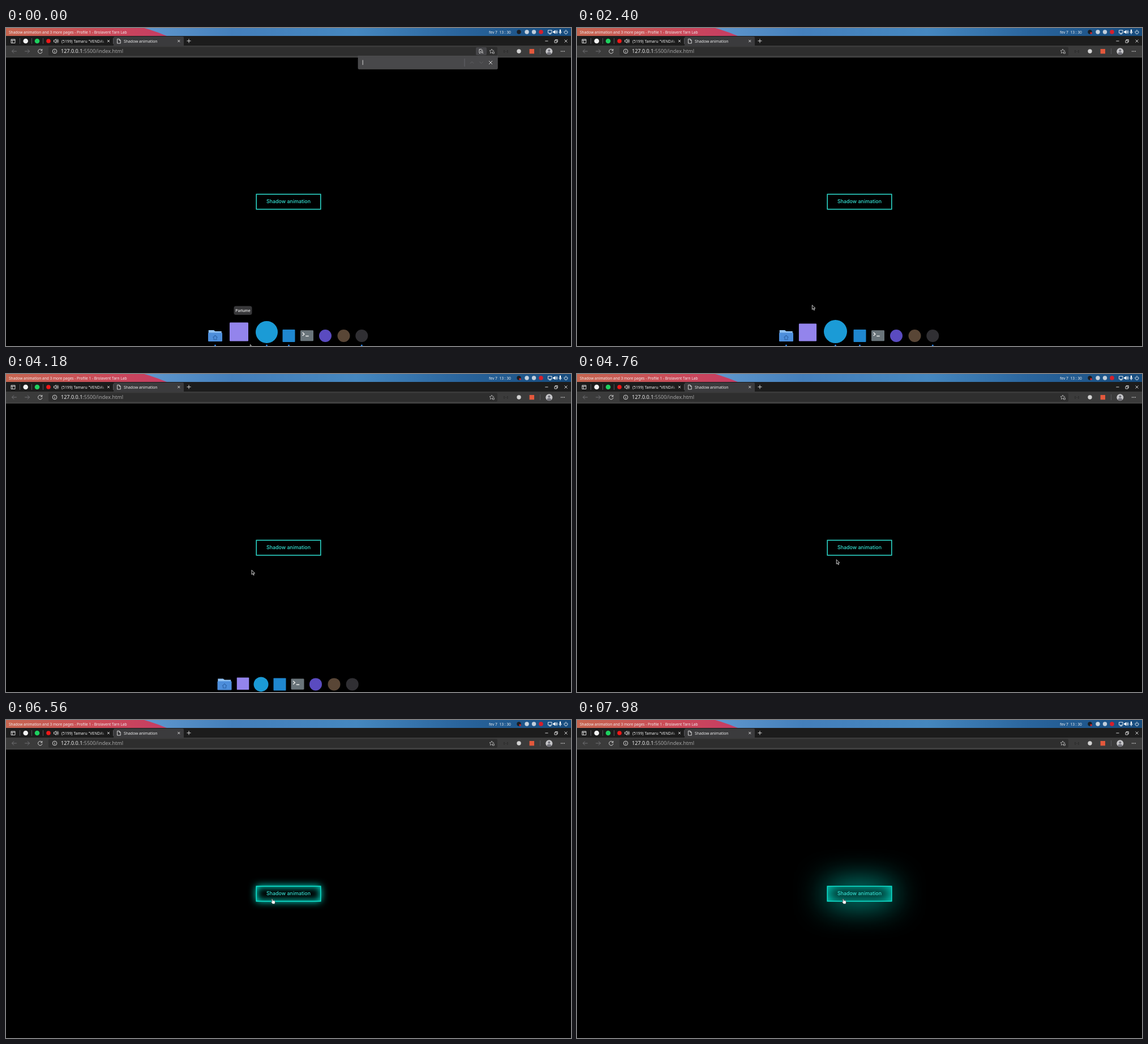
Recreate the animation shown at these times as an HTML page. Size 998x561 px, loop 8 s.

```html
<!DOCTYPE html>
<html lang="en">
<head>
<meta charset="utf-8">
<title>Shadow animation</title>
<style>
  html, body { margin: 0; width: 100%; height: 100%; overflow: hidden; background: #000; }
  svg { position: absolute; left: 0; top: 0; }
  text { font-family: "Noto Sans", sans-serif; fill: #eee; white-space: pre; }
  .line { fill: none; stroke: #e4e4e4; stroke-width: .9; }
  .dim { stroke: #77777a; }
  .rule { stroke: #55555a; stroke-width: 1; }
  #glow {
    position: absolute; left: 442px; top: 293px; width: 114px; height: 27px;
    box-sizing: border-box; border: 1px solid transparent;
  }
  .label { font: 500 8.9px Inter, sans-serif; fill: #35e2d4; text-anchor: middle; }
</style>
</head>
<body>
<svg width="998" height="561" viewBox="0 0 998 561">
  <defs>
    <linearGradient id="sky">
      <stop offset=".24" stop-color="#6199cf"/><stop offset=".4" stop-color="#447fbb"/>
      <stop offset=".62" stop-color="#4587bf"/><stop offset=".8" stop-color="#2a659d"/>
      <stop offset="1" stop-color="#164b7d"/>
    </linearGradient>
    <linearGradient id="dusk">
      <stop offset="0" stop-color="#c66650"/><stop offset=".6" stop-color="#cb4a58"/>
      <stop offset="1" stop-color="#c63c64"/>
    </linearGradient>
    <linearGradient id="fade">
      <stop offset=".8" stop-color="#eee"/><stop offset="1" stop-color="#eee" stop-opacity=".1"/>
    </linearGradient>
    <clipPath id="page"><path d="M600 49H900V90H600Z"/></clipPath>
    <clipPath id="tabTitle"><path d="M96 15H173V31H96Z"/></clipPath>
  </defs>

  <!-- system bar -->
  <path fill="url(#sky)" d="M0 0H998V14H0Z"/>
  <path fill="url(#dusk)" d="M0 0H244Q266 6 284 14H0Z"/>
  <text x="5" y="9.7" font-size="6.55">Shadow animation and 3 more pages - Profile 1 - Brolavent Tarn Lab</text>
  <text x="853" y="10" font-size="6.7">fev 7  13 : 30</text>
  <circle cx="906" cy="7" r="3.7" fill="#1b1d22"/>
  <circle id="recording" cx="908" cy="9" r="1.7" fill="#e02020"/>
  <circle cx="920" cy="7" r="3.7" fill="#c6d2de"/>
  <circle cx="932.5" cy="7" r="3.7" fill="#c0cddb"/>
  <circle cx="945" cy="7" r="3.8" fill="#d81f2c"/>
  <g class="line" style="stroke:#fff">
    <path d="M957.5 4H964V9H957.5ZM959 10.5H963"/>
    <path fill="#fff" d="M966.5 6H968L970 4V10L968 8H966.5Z"/>
    <path d="M971.5 5Q973 7 971.5 9M972.8 3.8Q975 7 972.8 10.2"/>
    <path d="M979 3.5V7" stroke-width="2.2" stroke-linecap="round"/>
    <path d="M976.8 6.5Q977 9 979 9T981.2 6.5M979 9V11"/>
    <path d="M987.3 4.8A3 3 0 1 0 990.7 4.8M989 3.2V7"/>
  </g>

  <!-- tab strip -->
  <path fill="#1c1c1c" d="M0 14H998V31H0Z"/>
  <path fill="#3b3b3d" d="M190 31V17Q190 15 192 15H312Q314 15 314 17V31Z"/>
  <path class="rule" d="M24.5 18V28M45.5 18V28M65.5 18V28M189.5 18V28"/>
  <path class="line" d="M9 20H16V26.5H9ZM9 21.7H16M11.3 22V26"/>
  <circle cx="34.7" cy="23" r="4.3" fill="#f2f2f2"/>
  <circle cx="55" cy="23" r="4.3" fill="#1ed05f"/>
  <circle cx="75" cy="23" r="3.8" fill="#f01818"/>
  <path class="line" d="M84.5 21.5H86L88.5 19.5V26.5L86 24.5H84.5ZM90 21Q91.3 23 90 25M91.3 19.5Q93.5 23 91.3 26.5"/>
  <text x="98" y="25.5" font-size="6.8" clip-path="url(#tabTitle)" style="fill:url(#fade)">(5199) Tamaru "VENDAVA</text>
  <path class="line" d="M179 21L183 25M183 21L179 25M303.3 21L307.3 25M307.3 21L303.3 25"/>
  <path class="line" d="M196.5 19.3H200L202.3 21.6V27H196.5ZM199.8 19.5V21.8H202"/>
  <text x="208" y="25.5" font-size="6.8">Shadow animation</text>
  <path class="line" d="M319.5 22.8H326.5M323 19.3V26.3"/>
  <path class="line" d="M952.3 23H957.5M969 22H973V26H969ZM970.3 22V20.5H974.3V24.6H973M986.5 20.5L991.5 25.5M991.5 20.5L986.5 25.5"/>

  <!-- toolbar -->
  <path fill="#3b3b3b" d="M0 31H998V52H0Z"/>
  <path fill="#505050" d="M0 51H998V52H0Z"/>
  <rect x="75" y="33.5" width="793" height="15.2" rx="2" fill="#2e2e2e"/>
  <path class="line dim" d="M18.8 41H10.5M14 37.5L10.5 41L14 44.5M33.2 41H41.5M38 37.5L41.5 41L38 44.5"/>
  <path class="line" d="M63.6 39.4A3.7 3.7 0 1 0 64 41.7M63.8 37V39.8H61"/>
  <g class="line"><circle cx="86" cy="41" r="3.8"/><path d="M86 40.4V43.2M86 38.8V39.7"/></g>
  <text x="97" y="44.2" font-size="9.05">127.0.0.1<tspan style="fill:#a4a4a4">:5500/index.html</tspan></text>
  <g id="pageSearch">
    <rect x="830" y="34" width="19" height="14" rx="2" fill="#454548"/>
    <path class="line" d="M836 44V37.5H840L842 39.5M836 44.5H838"/>
    <circle class="line" cx="840.3" cy="42" r="1.8"/><path class="line" d="M841.6 43.3L843 45"/>
  </g>
  <path class="line" style="stroke:#b4b4b4" d="M859 44L857.5 43.2L855.4 44.5L856 41.8L854 39.9L856.8 39.6L858 37L859.2 39.6L862 39.9M859.5 42H862.3V45H859.5Z"/>
  <text x="879.3" y="43" font-size="5" style="fill:#161616">[···]</text>
  <circle cx="906" cy="41" r="3.7" fill="#d2d2d2"/>
  <path fill="#e3583c" d="M924.6 37H933V45.3H924.6Z"/>
  <path class="rule" d="M943.5 36V46"/>
  <circle cx="959.3" cy="41.3" r="6" fill="#c5c5c8"/>
  <path fill="#707078" d="M955.2 45.2Q956 42.4 959.3 42.4T963.4 45.2Q959.3 49 955.2 45.2Z"/>
  <circle cx="959.3" cy="39.7" r="2" fill="#707078"/>
  <path fill="#e4e4e4" d="M980 40.4h1.4v1.4h-1.4zM982.8 40.4h1.4v1.4h-1.4zM985.6 40.4h1.4v1.4h-1.4z"/>

  <g clip-path="url(#page)">
    <g id="findBar">
      <path fill="#48484a" stroke="#59595c" stroke-width=".6" d="M622 49H868.3V71Q868.3 72.6 866.5 72.6H624Q622 72.6 622 71Z"/>
      <path class="line" d="M630.2 56.5V65.2M853 58L859 64M859 58L853 64"/>
      <path class="rule" style="stroke:#636368" d="M810 54V68"/>
      <path class="line" style="stroke:#626265" d="M820 62.5L823 59.5L826 62.5M836.5 59.5L839.5 62.5L842.5 59.5"/>
    </g>
  </g>

  <g id="tooltip">
    <rect x="402.5" y="490.5" width="32" height="15.6" rx="3.5" fill="#38383a"/>
    <text x="418.5" y="500.8" font-size="6.7" text-anchor="middle" style="font-family:Inter,sans-serif;font-weight:500">Parlume</text>
  </g>
  <g id="dock"></g>
</svg>

<div id="glow"></div>

<svg width="998" height="561" viewBox="0 0 998 561">
  <rect id="border" x="442.2" y="293.3" width="113.6" height="26.4" fill="none" stroke-width="1.5"/>
  <text class="label" x="499" y="309.3">Shadow animation</text>
  <path id="arrow" fill="#111" stroke="#eee" stroke-width=".8" d="M.4 .4V8.2L2.2 6.5L3.5 9.5L4.8 8.9L3.5 6H6Z"/>
  <path id="hand" fill="#fff" stroke="#222" stroke-width=".6" transform="translate(468 315)"
    d="M1.2 .8Q2.2 0 2.7 1.2L3.3 3.4Q6.6 3 7.2 4.8Q7.8 7 6.6 9.4H2.8L.4 6.3Q.3 5 1.9 5.5Z"/>
</svg>

<script>
const LOOP = 8000;
const $ = id => document.getElementById(id);
const show = (id, on) => $(id).setAttribute('visibility', on ? 'visible' : 'hidden');

// Linear interpolation through [time, value] points.
function track(t, points) {
  if (t <= points[0][0]) return points[0][1];
  for (let i = 1; i < points.length; i++) {
    const [t0, a] = points[i - 1], [t1, b] = points[i];
    if (t < t1) return a + (b - a) * (t - t0) / (t1 - t0);
  }
  return points[points.length - 1][1];
}

// Icon art is one unit wide, centred on x = 0, standing on y = 0.
const disc = color => `<circle cy="-.5" r=".5" fill="${color}"/>`;
const tile = color => `<rect x="-.5" y="-1" width="1" height="1" rx=".04" fill="${color}"/>`;
const folder = `<path fill="#8ec0f2" d="M-.47-.8H-.1L0-.72H.45V-.3H-.47Z"/>
  <rect x="-.5" y="-.62" width="1" height=".62" rx=".05" fill="#4d8edb"/>
  <path d="M-.16-.28L0-.43L.16-.28M-.1-.3V-.14H.1V-.3" fill="none" stroke="#3169ae" stroke-width=".05"/>`;
const terminal = `<rect x="-.5" y="-.83" width="1" height=".83" rx=".06" fill="#69747a"/>
  <path d="M-.34-.66L-.2-.53L-.34-.4M-.1-.38H.14" fill="none" stroke="#eee" stroke-width=".06"/>`;

// x and size: pointer inside, pointer leaving, at rest.
const icons = [
  { art: folder, x: [369.5, 369.5, 386], size: [25, 25, 25], foot: 553, running: true },
  { art: tile('#9384ec'), x: [411.5, 407.5, 418.5], size: [33, 31.2, 21.5], foot: 552.6 },
  { art: disc('#1b9bd6'), x: [460.5, 456.5, 450.5], size: [39, 41, 26], foot: 556, running: true },
  { art: tile('#1f87cf'), x: [499.5, 499.5, 483.5], size: [22, 22, 22], foot: 554, running: true },
  { art: terminal, x: [531.5, 531.5, 515], size: [23, 23, 23], foot: 552.3 },
  { art: disc('#5a4bc0'), x: [564, 564, 547], size: [22, 22, 22], foot: 554 },
  { art: disc('#594636'), x: [596.5, 596.5, 579.5], size: [22, 22, 22], foot: 554 },
  { art: disc('#302f33'), x: [628.3, 628.3, 611.7], size: [22, 22, 22], foot: 554, running: true }
];
$('dock').innerHTML = icons.map(icon => `<g>${icon.art}</g>` +
  `<circle cy="560" r="${icon.running ? 1.5 : 0}" fill="#2c83e6"/>`).join('');

const poseTimes = [2220, 2400, 2740, 3020];
const pose = (t, [inside, leaving, rest]) =>
  track(t, [inside, leaving, leaving, rest].map((v, i) => [poseTimes[i], v]));

function drawDock(t) {
  icons.forEach((icon, i) => {
    const x = pose(t, icon.x), [art, dot] = [...$('dock').children].slice(i * 2);
    art.setAttribute('transform', `translate(${x} ${icon.foot}) scale(${pose(t, icon.size)})`);
    dot.setAttribute('cx', x);
  });
  $('dock').setAttribute('transform', `translate(0 ${track(t, [[4120, 0], [4620, 36]])})`);
}

const pointer = [
  [2200, 431, 558], [2400, 415, 488.5], [2920, 391, 443.5], [2960, 390, 427], [3040, 390, 427],
  [3100, 393, 411], [3320, 393, 411], [3380, 391, 407], [3500, 391, 407],
  [4180, 433.5, 345.5], [4320, 440, 343], [4900, 463.5, 322], [5160, 463.5, 322], [5180, 463.5, 321]
];
const pointerX = pointer.map(([t, x]) => [t, x]);
const pointerY = pointer.map(([t, , y]) => [t, y]);

function drawButton(t) {
  const hover = (t - 5460) / 1000;
  const lit = hover >= 0;
  const outer = 4 + 8 * hover ** 2, inner = 10 + 2.2 * hover ** 2;
  $('glow').style.boxShadow = lit
    ? `0 0 ${outer}px #00ecd6, inset 0 0 ${inner}px #00ecd6` : 'none';
  $('border').setAttribute('stroke', lit ? '#10e8d4' : '#2fe0d2');
  show('hand', lit);
  show('arrow', !lit);
}

function frame() {
  const t = performance.now() % LOOP;
  $('findBar').setAttribute('transform', `translate(0 ${track(t, [[300, 0], [500, -25]])})`);
  show('findBar', t < 500);
  show('recording', t >= 580);
  show('pageSearch', t < 720);
  show('tooltip', t < 2260);
  $('arrow').setAttribute('transform', `translate(${track(t, pointerX)} ${track(t, pointerY)})`);
  drawDock(t);
  drawButton(t);
  requestAnimationFrame(frame);
}
frame();
</script>
</body>
</html>
```
